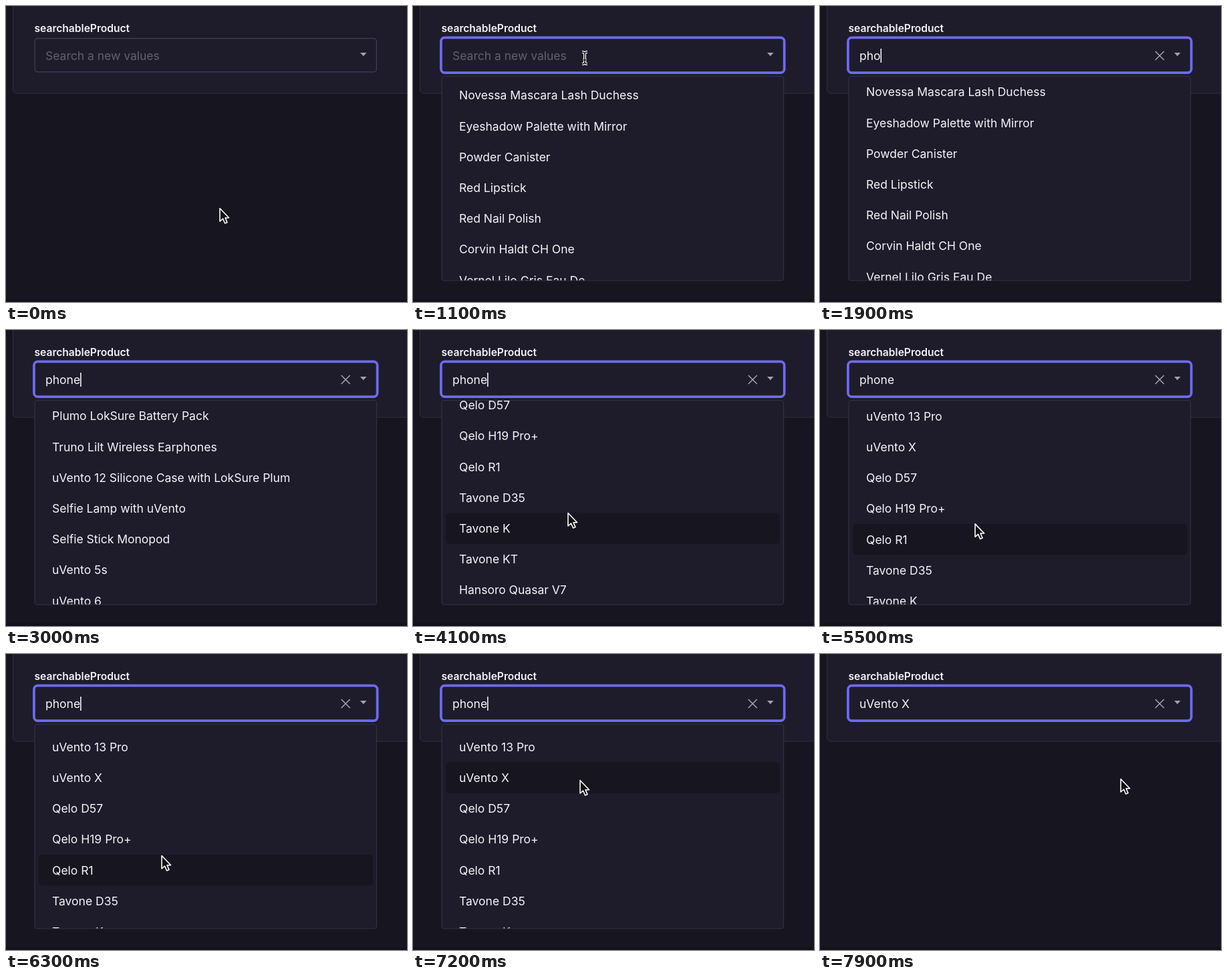
An HTML page with a canvas that plays this animation: 600x444 px, repeating every 8 s.

```html
<!DOCTYPE html>
<html lang="en">
<head>
<meta charset="utf-8">
<title>Searchable combobox</title>
<style>
  html, body { margin: 0; width: 600px; height: 444px; overflow: hidden; background: #17151f; }
  canvas { display: block; }
</style>
</head>
<body>
<canvas id="stage" width="600" height="444"></canvas>
<script>
const ctx = document.getElementById('stage').getContext('2d');
const LOOP = 8000, STEP = 100, ROW = 46.2, FIRST_ROW = 134;
const OPEN = 600, TYPE = 1500, LOADED = 2500, SELECT = 7300;
const QUERY = 'phone', CHOICE = 'uVento X';

const allProducts = [
  'Novessa Mascara Lash Duchess', 'Eyeshadow Palette with Mirror', 'Powder Canister',
  'Red Lipstick', 'Red Nail Polish', 'Corvin Haldt CH One', 'Vernel Lilo Gris Eau De'
];
const matches = [
  'Plumo LokSure Battery Pack', 'Truno Lilt Wireless Earphones',
  'uVento 12 Silicone Case with LokSure Plum', 'Selfie Lamp with uVento',
  'Selfie Stick Monopod', 'uVento 5s', 'uVento 6', 'uVento 13 Pro', CHOICE,
  'Qelo D57', 'Qelo H19 Pro+', 'Qelo R1', 'Tavone D35', 'Tavone K', 'Tavone KT',
  'Hansoro Quasar V7', 'Hansoro Quasar V8', 'Hansoro Quasar V10'
];

// Keyframes: [time, ...values]
const mousePath = [
  [0, 320, 304], [500, 257, 78], [3000, 257, 78], [3200, 232, 275], [4100, 232, 275],
  [4700, 232, 277], [5300, 232, 290], [6300, 233, 303], [7100, 250, 190],
  [7300, 250, 190], [7900, 450, 188]
];
const scrollPath = [
  [1400, 0], [1500, 5], [3400, 5], [4100, 437], [4300, 437], [4700, 338], [6300, 318]
];

function track(keys, t) {
  const i = keys.findIndex(key => key[0] > t);
  if (i === 0) return keys[0].slice(1);
  if (i < 0) return keys[keys.length - 1].slice(1);
  const a = keys[i - 1], b = keys[i];
  const p = (t - a[0]) / (b[0] - a[0]), eased = p * p * (3 - 2 * p);
  return a.slice(1).map((v, k) => v + (b[k + 1] - v) * eased);
}

function box(x, y, w, h, r, fill, stroke, width = 1) {
  ctx.beginPath();
  ctx.roundRect(x, y, w, h, r);
  if (fill) { ctx.fillStyle = fill; ctx.fill(); }
  if (stroke) { ctx.strokeStyle = stroke; ctx.lineWidth = width; ctx.stroke(); }
}

function text(str, x, baseline, color = '#f4f4f8', font = '17.5px') {
  ctx.font = font + ' Inter, sans-serif';
  ctx.fillStyle = color;
  ctx.fillText(str, x, baseline);
}

function drawField(value, focused, caret) {
  text('searchableProduct', 42.5, 38.5, '#f4f4f8', '600 15.6px');
  if (focused) box(41.9, 47.4, 513.7, 52.7, 5.6, '#1e1c2b', '#6f6af3', 3.75);
  else box(43.1, 48.6, 511.3, 50.2, 4.4, '#1e1c2b', '#413f5a', 1.25);
  text(value || 'Search a new values', 59, 81, value ? '#f4f4f8' : '#62606c');
  if (caret) {
    ctx.fillStyle = '#fff';
    ctx.fillRect(59 + (value ? ctx.measureText(value).width : 0), 64, 1.5, 21);
  }
  ctx.fillStyle = '#a3a1b0';
  ctx.fill(new Path2D('M530 70H539.5L534.7 75.2Z'));
  if (value) {
    ctx.strokeStyle = '#a3a1b0';
    ctx.lineWidth = 1.6;
    ctx.stroke(new Path2D('M501.7 68L514.7 81M514.7 68L501.7 81'));
  }
}

function drawList(items, scroll, hoverY) {
  box(43, 105.5, 511.5, 306.5, 4, '#1e1c2b', '#323045', 1.2);
  ctx.save();
  ctx.beginPath();
  ctx.rect(44, 106, 510, 305.5);
  ctx.clip();
  items.forEach((item, i) => {
    const y = FIRST_ROW + i * ROW - scroll;
    if (Math.abs(hoverY - y) < ROW / 2) box(49, y - ROW / 2, 500, ROW, 5, '#17151f');
    text(item, 69, y + 6.3);
  });
  ctx.restore();
}

function drawMouse(x, y, overInput) {
  ctx.save();
  ctx.translate(x, y);
  ctx.lineJoin = 'round';
  if (overInput) {
    const beam = new Path2D('M-4 -9Q0 -9 0 -6Q0 -9 4 -9M0 -6V6M-4 9Q0 9 0 6Q0 9 4 9M-2.5 3H2.5');
    for (const [color, width] of [['#fff', 4], ['#111', 1.5]]) {
      ctx.strokeStyle = color;
      ctx.lineWidth = width;
      ctx.stroke(beam);
    }
  } else {
    const arrow = new Path2D('M0 -.5V19L4.5 15L7.6 22L11 20.6L8 13.7H13.6Z');
    ctx.fillStyle = '#111';
    ctx.fill(arrow);
    ctx.strokeStyle = '#fff';
    ctx.lineWidth = 1.6;
    ctx.stroke(arrow);
  }
  ctx.restore();
}

function render(t) {
  const [mx, my] = track(mousePath, t), [scroll] = track(scrollPath, t);
  const focused = t >= OPEN, open = focused && t < SELECT;
  const typed = Math.max(0, Math.floor((t - TYPE) / 150) + 1);
  const value = t >= SELECT ? CHOICE : QUERY.slice(0, typed);
  const typing = t >= TYPE && t <= 2200;
  const blinkOn = t < 1000 || (t >= 2000 && t % 1000 < 500);
  const mouseVisible = t < TYPE || t > 3000;

  ctx.fillStyle = '#17151f';
  ctx.fillRect(0, 0, 600, 444);
  ctx.fillStyle = '#15111c';
  ctx.fillRect(0, 440, 600, 4);
  box(10.5, -10, 620, 141, 5, '#1e1c2b', '#302e40');
  drawField(value, focused, focused && (typing || blinkOn));
  if (open) drawList(t < LOADED ? allProducts : matches, scroll, mouseVisible ? my : -100);
  if (mouseVisible) drawMouse(mx, my, my > 48 && my < 100);
}

function tick(now) {
  render(Math.floor((now % LOOP) / STEP) * STEP);
  requestAnimationFrame(tick);
}
requestAnimationFrame(tick);
</script>
</body>
</html>
```
